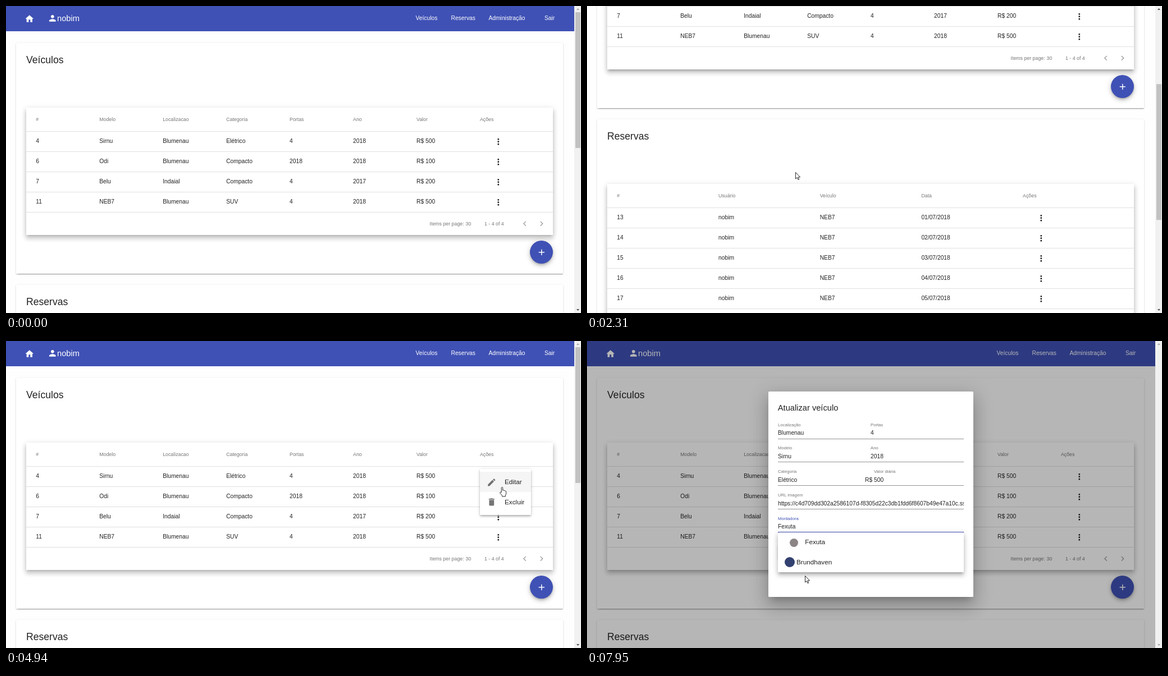
An HTML page that plays this animation: 1024x547 px, repeating every 8 s.

```html
<!DOCTYPE html>
<html lang="pt">
<head>
<meta charset="utf-8">
<title>Veículos</title>
<style>
html, body { margin: 0; width: 100%; height: 100%; overflow: hidden; background: #fefefe; }
body { position: relative; font-family: "Liberation Sans", Arial, sans-serif; color: rgba(0,0,0,.87); }
div { position: absolute; box-sizing: border-box; }
svg { position: absolute; overflow: visible; }
.t { white-space: pre; line-height: 20px; font-size: 10.27px; }
.s { font-size: 8.8px; color: rgba(0,0,0,.54); }
.l { font-size: 7.7px; color: rgba(0,0,0,.54); }
.m { font-size: 11.73px; }
.h1 { font-size: 17.6px; }
.h2 { font-size: 14.67px; }
.w { color: #fff; }
.strong { color: #fff; -webkit-text-stroke: .3px #fff; }
.card, .raised { background: #fff; border-radius: 1.5px;
  box-shadow: 0 2.2px .8px -1.5px rgba(0,0,0,.2), 0 1.5px 1.5px rgba(0,0,0,.14), 0 .8px 3.7px rgba(0,0,0,.12); }
.table { background: #fff;
  box-shadow: 0 3.7px 3.7px -2.2px rgba(0,0,0,.2), 0 5.9px 7.3px .7px rgba(0,0,0,.14), 0 2.2px 10.3px 1.5px rgba(0,0,0,.12); }
.fab { background: #3f51b5; border-radius: 50%;
  box-shadow: 0 2.2px 3.7px -.7px rgba(0,0,0,.2), 0 4.4px 7.3px rgba(0,0,0,.14), 0 .7px 13px rgba(0,0,0,.12); }
.pop { background: #fff; border-radius: 1.5px;
  box-shadow: 0 1.5px 2.9px -.7px rgba(0,0,0,.2), 0 2.9px 3.7px rgba(0,0,0,.14), 0 .7px 7.3px rgba(0,0,0,.12); }
.list { background: #fff; border-radius: 1.5px;
  box-shadow: 0 3.7px 3.7px -2.2px rgba(0,0,0,.2), 0 5.9px 7.3px .7px rgba(0,0,0,.14), 0 2.2px 10.3px 1.5px rgba(0,0,0,.12); }
.dialog { background: #fff; border-radius: 1.5px;
  box-shadow: 0 8px 11px -5px rgba(0,0,0,.2), 0 17.6px 28px 2px rgba(0,0,0,.14), 0 6.6px 34px 6px rgba(0,0,0,.12); }
</style>
</head>
<body>
<script>
const BLUE = '#3f51b5', LINE = 'rgba(0,0,0,.12)';
const ICON = {
  home: 'M10 20v-6h4v6h5v-8h3L12 3 2 12h3v8z',
  person: 'M12 12c2.21 0 4-1.79 4-4s-1.79-4-4-4-4 1.79-4 4 1.79 4 4 4zm0 2c-2.67 0-8 1.34-8 4v2h16v-2c0-2.66-5.33-4-8-4z',
  plus: 'M19 13h-6v6h-2v-6H5v-2h6V5h2v6h6v2z',
  more: 'M12 8a2 2 0 1 0 0-4 2 2 0 0 0 0 4zm0 2a2 2 0 1 0 0 4 2 2 0 0 0 0-4zm0 6a2 2 0 1 0 0 4 2 2 0 0 0 0-4z',
  prev: 'M15.41 7.41L14 6l-6 6 6 6 1.41-1.41L10.83 12z',
  next: 'M10 6L8.59 7.41 13.17 12l-4.58 4.59L10 18l6-6z',
  edit: 'M3 17.25V21h3.75L17.81 9.94l-3.75-3.75L3 17.25zM20.71 7.04a1 1 0 0 0 0-1.41l-2.34-2.34a1 1 0 0 0-1.41 0l-1.83 1.83 3.75 3.75 1.83-1.83z',
  trash: 'M6 19c0 1.1.9 2 2 2h8c1.1 0 2-.9 2-2V7H6v12zM19 4h-3.5l-1-1h-5l-1 1H5v2h14V4z'
};
const POINTER = {
  arrow: 'M.5 .5V12L3.2 9.5 5 13.6 6.8 12.9 5 8.9H8.6Z',
  hand: 'M-1.2 9V1.1Q-1.2 0 0 0T1.2 1.1V5.5Q3.2 4.8 3.5 6.1 5.2 5.5 5.5 6.8 7.1 6.5 7.1 8.1V12L5.9 14.7V16.5H.1V14.9L-3.8 10.3Q-4.2 8.9-2.7 8.7Z',
  text: 'M-2-5.5Q0-5.5 0-4.5 0-5.5 2-5.5M0-4.5V5M-2 6Q0 6 0 5 0 6 2 6'
};

function box(parent, x, y, w, h, cls = '', bg) {
  const el = document.createElement('div');
  el.className = cls;
  el.style.cssText = `left:${x}px;top:${y}px;width:${w}px;height:${h}px`;
  if (bg) el.style.background = bg;
  parent.append(el);
  return el;
}
// y is the middle of the line
function text(parent, x, y, str, cls = '') {
  const el = document.createElement('div');
  el.className = 't ' + cls;
  el.style.cssText = `left:${x}px;top:${y - 10}px`;
  el.textContent = str;
  parent.append(el);
  return el;
}
function svg(parent, d, x, y, size, fill, extra = '') {
  parent.insertAdjacentHTML('beforeend',
    `<svg width="${size}" height="${size}" viewBox="0 0 24 24" style="left:${x - size / 2}px;top:${y - size / 2}px"><path d="${d}" fill="${fill}" ${extra}/></svg>`);
  return parent.lastElementChild;
}
const icon = (parent, name, x, y, fill = 'rgba(0,0,0,.87)') => svg(parent, ICON[name], x, y, 17.6, fill);

// Page
const view = box(document.body, 0, 0, 1012, 547);
view.style.overflow = 'hidden';
const page = box(view, 0, 0, 1012, 1192);
box(page, 0, 0, 1012, 45, '', BLUE);
icon(page, 'home', 42, 22.3, '#fff');
icon(page, 'person', 83, 22, '#fff');
text(page, 91, 22, 'nobim', 'h2 w');
[['Veículos', 729.5], ['Reservas', 792.5], ['Administração', 859.5], ['Sair', 959]]
  .forEach(([s, x]) => text(page, x, 22, s, 'w'));

const hovers = [];
function table(top, title, heads, rows, step) {
  const y = top + 115, last = y + 42 + rows.length * 36;
  box(page, 18, top, 974, last + 110 - top, 'card');
  text(page, 36, top + 30, title, 'h1');
  box(page, 36, y, 938, last + 41 - y, 'table');
  heads.forEach((s, i) => text(page, 53.3 + i * step, y + 21, s, 's'));
  const end = 53.3 + (heads.length - 1) * step;
  rows.forEach((row, r) => {
    const mid = y + 60 + r * 36;
    box(page, 36, mid - 18.5, 938, 1, '', LINE);
    row.forEach((s, i) => text(page, 53.3 + i * step, mid, s));
    hovers.push(box(page, end + .3, mid - 13, 64.5, 26, '', LINE));
    icon(page, 'more', end + 32.5, mid + .5);
  });
  box(page, 36, last - .5, 938, 1, '', LINE);
  text(page, 754.5, last + 20.5, 'Items per page:', 's');
  text(page, 818.5, last + 20.5, '30', 's');
  text(page, 852, last + 20.5, `1 - ${rows.length} of ${rows.length}`, 's');
  icon(page, 'prev', 924, last + 21, 'rgba(0,0,0,.36)');
  icon(page, 'next', 953.5, last + 21, 'rgba(0,0,0,.36)');
  box(page, 933, last + 51, 41, 41, 'fab');
  icon(page, 'plus', 953.5, last + 71.8, '#fff');
}
table(66, 'Veículos',
  ['#', 'Modelo', 'Localizacao', 'Categoria', 'Portas', 'Ano', 'Valor', 'Ações'], [
    ['4', 'Sirnu', 'Blumenau', 'Elétrico', '4', '2018', 'R$ 500'],
    ['6', 'Odi', 'Blumenau', 'Compacto', '2018', '2018', 'R$ 100'],
    ['7', 'Belu', 'Indaial', 'Compacto', '4', '2017', 'R$ 200'],
    ['11', 'NEB7', 'Blumenau', 'SUV', '4', '2018', 'R$ 500']
  ], 112.95);
table(497, 'Reservas', ['#', 'Usuário', 'Veículo', 'Data', 'Ações'],
  Array.from({ length: 11 }, (_, i) =>
    [`${13 + i}`, 'nobim', 'NEB7', `${String(i + 1).padStart(2, '0')}/07/2018`]), 180.7);

// Row menu
const menu = box(view, 844, 228, 91, 82, 'pop');
menu.style.transformOrigin = '0 0';
const menuHover = box(menu, 0, 5, 91, 36);
icon(menu, 'edit', 20.5, 24, 'rgba(0,0,0,.54)');
icon(menu, 'trash', 20.5, 59, 'rgba(0,0,0,.54)');
text(menu, 44, 23, 'Editar', 'm');
text(menu, 44, 58.5, 'Excluir', 'm');

const shade = box(view, 0, 0, 1012, 547, '', '#000');

// Dialog, laid out in stage coordinates
const dialog = box(view, 322.5, 90, 365.5, 366, 'dialog');
const form = box(dialog, -322.5, -90, 0, 0);
text(form, 339.8, 119, 'Atualizar veículo', 'h2');
const FIELDS = [
  [0, 340, 'Localização', 'Blumenau'], [0, 505, 'Portas', '4'],
  [1, 340, 'Modelo', 'Sirnu'], [1, 505, 'Ano', '2018'],
  [2, 340, 'Categoria', 'Elétrico'], [2, 511, 'Valor diária', '500'],
  [3, 340, 'URL imagem', 'https://c4d709dd302a2586107d-f8305d22c3db1fdd6f8607b49e47a10c.ss'],
  [4, 340, 'Montadora', 'Fexuta']
];
const labels = FIELDS.map(([r, x, name, value]) => {
  const y = 149.5 + r * 41.8;
  const el = text(form, x, y + 14.7, value);
  if (r === 3) Object.assign(el.style, { width: '331px', overflow: 'hidden' });
  return text(form, x, y, name, 'l');
});
text(form, 495, 247.8, 'R$');
for (let r = 0; r < 5; r++) box(form, 340, 173.5 + r * 41.8, 331, .9, '', 'rgba(0,0,0,.42)');
const lines = [box(form, 340, 173, 165.5, 1.6, '', BLUE), box(form, 340, 340, 331, 1.6, '', BLUE)];
const caret = box(form, 386, 159, .9, 11, '', '#111');
box(form, 340, 362.5, 64.5, 26.5, 'raised');
text(form, 356.3, 376, 'Fechar');
box(form, 410, 362.5, 65, 26.5, 'raised', BLUE);
text(form, 422.3, 376, 'Atualizar', 'strong');

const list = box(form, 340, 341, 331, 70.5, 'list');
list.style.transformOrigin = '50% 0';
box(list, 21, 10.5, 15, 15, '', '#8c8586').style.borderRadius = '50%';
box(list, 12, 44, 18, 18, '', '#32416f').style.borderRadius = '50%';
text(list, 48.3, 17.3, 'Fexuta', 'm');
text(list, 33, 52.7, 'Brundhaven', 'm');

// Scrollbar
const bar = box(document.body, 1012, 0, 12, 547, '', '#f1f1f1');
const thumb = box(bar, 2, 11, 9, 241.5, '', '#c1c1c1');
const up = svg(bar, 'M5 16L12 8 19 16Z', 6.5, 5.5, 9, '#505050');
const down = svg(bar, 'M5 8L12 16 19 8Z', 6.5, 541, 9, '#505050');

const mouse = {};
for (const kind in POINTER) {
  const look = kind === 'text' ? ['none', 1] : ['#fff', .9];
  mouse[kind] = svg(document.body, POINTER[kind], 12, 12, 24, look[0], `stroke="#111" stroke-width="${look[1]}"`);
}

// Motion
const LOOP = 8000, STEP = 77.2;
const MENU = 4200, OPEN = 5053, FOCUS = 5450, PICK = 7250;
const PATH = [
  [460, 996, 514], [1130, 876, 245], [1470, 876, 245], [2000, 244.5, 180.5], [2010, 244.5, 180.5],
  [2160, 371, 296], [3300, 371, 296], [3860, 876, 244], [4540, 876, 244], [4750, 883.5, 260.5],
  [5390, 883.5, 260.5], [6170, 598, 286], [6245, 575, 286], [6470, 575, 286], [6550, 570, 294],
  [6700, 570, 294], [7080, 481, 326], [7690, 481, 326], [7870, 376, 392], [7945, 388, 418]
];
const SCROLL = [[2080, 0], [2395, 350], [2835, 350], [3210, 0]];

const ramp = (t, start, len) => Math.min(1, Math.max(0, (t - start) / len));
const smooth = p => p * p * (3 - 2 * p);
// cubic-bezier(.25, .8, .25, 1)
function swift(x) {
  let lo = 0, hi = 1;
  for (let i = 0; i < 20; i++) {
    const u = (lo + hi) / 2, v = 1 - u;
    if (.75 * v * u * (v + u) + u * u * u < x) lo = u; else hi = u;
  }
  const u = lo, v = 1 - u;
  return 2.4 * v * v * u + 3 * v * u * u + u * u * u;
}
function track(keys, t) {
  const i = keys.findIndex(k => k[0] > t);
  if (i === 0) return keys[0].slice(1);
  if (i < 0) return keys[keys.length - 1].slice(1);
  const a = keys[i - 1], b = keys[i], p = smooth((t - a[0]) / (b[0] - a[0]));
  return a.slice(1).map((v, j) => v + (b[j + 1] - v) * p);
}
const show = (el, on) => { el.style.visibility = on ? 'visible' : 'hidden'; };
const inside = (x, y, l, top, w, h) => x >= l && x <= l + w && y >= top && y <= top + h;

function focus(label, line, p) {
  label.style.color = `color-mix(in srgb, ${BLUE} ${p * 100}%, rgba(0,0,0,.54))`;
  line.style.opacity = p;
  line.style.transform = `scaleX(${.5 + p / 2})`;
}

function draw(now) {
  const t = Math.floor((now % LOOP + 8) / STEP) * STEP;
  const [x, y] = track(PATH, t), scroll = Math.round(track(SCROLL, t)[0]);
  const locked = t >= OPEN;

  page.style.transform = `translateY(${-scroll}px)`;
  thumb.style.transform = `translateY(${scroll * .4346}px)`;
  show(thumb, !locked);
  up.style.opacity = locked || scroll < 1 ? .45 : 1;
  down.style.opacity = locked ? .45 : 1;

  const seen = t >= 460;
  const hot = seen && t < MENU && scroll < 1
    ? [0, 1, 2, 3].findIndex(i => inside(x, y, 844, 228 + i * 36, 64.5, 26)) : -1;
  hovers.forEach((el, i) => show(el, i === hot));

  const grow = swift(ramp(t, MENU, 200));
  menu.style.opacity = grow * (1 - ramp(t, 5100, 140));
  menu.style.transform = `scale(${grow})`;
  menuHover.style.background = `rgba(0,0,0,${t < 5000 ? .04 : .14})`;

  const p = swift(ramp(t, OPEN, 400));
  shade.style.opacity = .288 * p;
  dialog.style.opacity = p;
  dialog.style.transform = `translateY(${91.5 * (1 - p)}px) scale(${.9 + .1 * p})`;

  const away = swift(ramp(t, PICK, 300));
  focus(labels[0], lines[0], swift(ramp(t, FOCUS, 300)) * (1 - away));
  focus(labels[7], lines[1], away);
  show(caret, t >= FOCUS && t < PICK && (t - FOCUS) % 1000 < 500);

  const drop = swift(ramp(t, PICK, 150));
  list.style.opacity = drop;
  list.style.transform = `scaleY(${drop})`;

  let kind = 'arrow';
  if (t < MENU) { if (hot >= 0 || (scroll < 1 && inside(x, y, 933, 418, 41, 41))) kind = 'hand'; }
  else if (t < OPEN) kind = 'hand';
  else if (y > 320 && y < 411) kind = 'hand';
  else if (x < 671 && y < 320) kind = 'text';
  for (const k in mouse) {
    show(mouse[k], seen && k === kind);
    mouse[k].style.transform = `translate(${x}px,${y}px)`;
  }
}

const start = performance.now();
function tick() {
  draw(performance.now() - start);
  requestAnimationFrame(tick);
}
tick();
</script>
</body>
</html>
```
